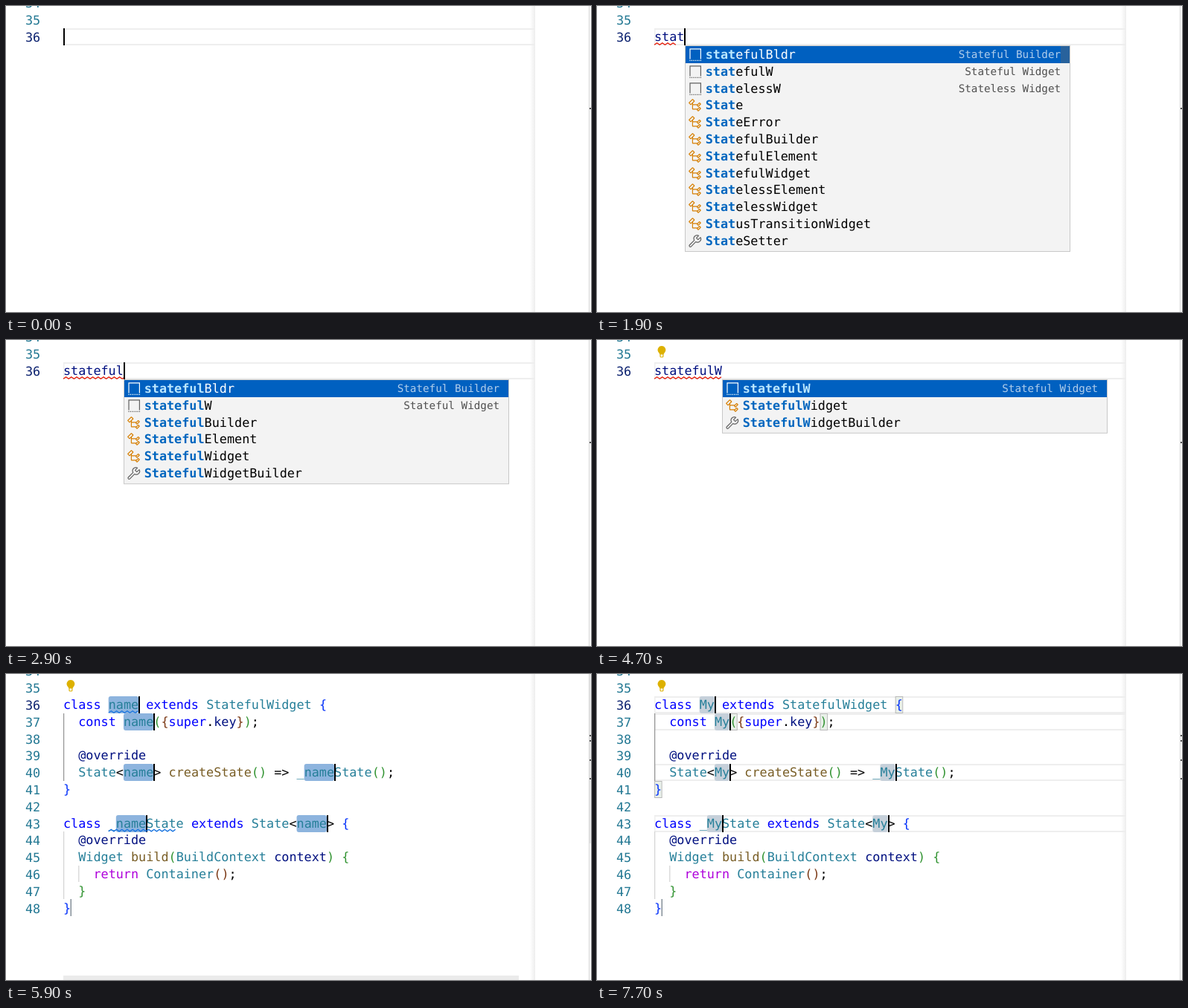
Recreate the animation shown at these times as an HTML page. Size 786 by 412 pixels, loop 8000 ms.

```html
<!DOCTYPE html>
<html lang="en">
<head>
<meta charset="utf-8">
<title>Stateful widget snippet</title>
<style>
  html, body { margin: 0; width: 100%; height: 100%; overflow: hidden; background: #fff; }
  svg { display: block; }
  text { font: 16.8px "DejaVu Sans Mono", monospace; white-space: pre; text-rendering: geometricPrecision; }
  .hit { font-weight: bold; }
  .detail { font-size: 14.28px; text-anchor: end; }
  .num { text-anchor: end; }
</style>
</head>
<body>
<svg id="stage" width="786" height="412" viewBox="0 0 786 412">
  <defs>
    <linearGradient id="shade">
      <stop offset="0" stop-color="#000" stop-opacity="0"/>
      <stop offset="1" stop-color="#000" stop-opacity=".07"/>
    </linearGradient>
    <g id="snippet" fill="none" stroke="currentColor">
      <path d="M2.5 13V1.5h12V13"/>
      <path d="M2 14.5h13" stroke-dasharray="1 1"/>
    </g>
    <path id="class" fill="currentColor" d="M11.34 9.71h.71l2.67-2.67v-.71L13.38 5h-.7l-1.82 1.81h-5V5.56l1.86-1.85V3l-2-2H5L1 5v.71l2 2h.71l1.14-1.15v5.79l.5.5H10v.52l1.33 1.34h.71l2.67-2.67v-.71L13.37 10h-.7l-1.86 1.85h-5v-4H10v.48zm1.69-3.65l.63.63-2 2-.63-.63zm0 5l.63.63-2 2-.63-.63zM3.35 6.65l-1.29-1.3 3.29-3.29 1.3 1.29z"/>
    <path id="wrench" fill="none" stroke="currentColor" stroke-linejoin="round" d="M2 12.3L7.3 7A3.7 3.7 0 0 1 12.2 1.8L9.6 4.5l1.9 1.9 2.7-2.6A3.7 3.7 0 0 1 9 8.7L3.7 14a1.2 1.2 0 0 1-1.7-1.7z"/>
    <g id="bulb">
      <path fill="#ddb100" d="M8.5 1A4.5 4.5 0 0 0 5.36 8.66C6.1 9.4 6.41 10.2 6.41 11.1v1.6a1.3 1.3 0 0 0 1.3 1.3h1.6a1.3 1.3 0 0 0 1.3-1.3v-1.6c0-.9.31-1.7 1.06-2.44A4.5 4.5 0 0 0 8.5 1z"/>
      <path fill="#fff" d="M7.4 10.5h2.2v2.2l-.3.3H7.7l-.3-.3z"/>
    </g>
  </defs>
  <g id="scene"></g>
</svg>
<script>
const LOOP = 8000, LEFT = 77, TOP = 30, CHAR = 10.114, ROW = 22.8;
const BLUE = '#0000ff', TEAL = '#267f99', NAVY = '#001080', BROWN = '#795e26';
const BRACKETS = ['#0431fa', '#319331', '#7b3814'];
const scene = document.getElementById('scene');

// "~" stands for the linked placeholder
const CODE = [
  'class ~ extends StatefulWidget {',
  '  const ~({super.key});',
  '',
  '  @override',
  '  State<~> createState() => _~State();',
  '}',
  '',
  'class _~State extends State<~> {',
  '  @override',
  '  Widget build(BuildContext context) {',
  '    return Container();',
  '  }',
  '}'
];

const DETAIL = {
  singleChildSV: 'Single Child ScrollView', snk: 'Sink', statefulBldr: 'Stateful Builder',
  statefulW: 'Stateful Widget', statelessW: 'Stateless Widget', streamBldr: 'Stream Builder',
  strm: 'Stream', subj: 'Subject'
};
const words = s => s.split(' ');
const STATE = words('State StateError StatefulBuilder StatefulElement StatefulWidget StatelessElement StatelessWidget');
const SHORT = words('statefulBldr statefulW statelessW');
const STAT = [...SHORT, ...STATE, 'StatusTransitionWidget', 'StateSetter'];
const FULL = [...words('statefulBldr statefulW StatefulBuilder StatefulElement StatefulWidget StatefulWidgetBuilder')];
const LISTS = [[],
  [...words('singleChildSV snk statefulBldr statefulW statelessW streamBldr strm subj'),
    'Flutter Widget with AnimationController', 'Flutter Stateful Widget', 'Flutter Stateless Widget', 'SafeArea'],
  [...SHORT, 'streamBldr', 'strm', ...STATE],
  STAT, STAT,
  [...SHORT, ...STATE, 'StateSetter', 'StatefulWidgetBuilder'],
  FULL, FULL, FULL,
  words('statefulW StatefulWidget StatefulWidgetBuilder')
];

// [time, value] steps
const TYPED = [[0, 0], [500, 1], [1400, 2], [1600, 3], [1800, 4], [2100, 5], [2400, 6], [2500, 7], [2900, 8], [3200, 9]];
const WAVY = [[0, 0], [1000, 1], [1600, 2], [1800, 3], [2100, 5], [2500, 6], [2900, 8], [3200, 9]];
const CARET = [[0, 1], [100, 0], [500, 1], [1000, 0], [1400, 1], [3700, 0], [4200, 1], [4700, 0],
  [4900, 1], [5400, 0], [5900, 1], [6400, 0], [6900, 1]];
const BULB = [[0, 0], [900, 1], [1400, 0], [3500, 1], [4900, 0], [5600, 1]];
const NAME = [[0, 'name'], [7100, 'M'], [7500, 'My']];
const at = (steps, t) => steps.reduce((v, s) => t >= s[0] ? s[1] : v, steps[0][1]);

const colX = c => LEFT + c * CHAR;
const rowY = r => TOP + r * ROW;
const esc = s => s.replace(/&/g, '&amp;').replace(/</g, '&lt;').replace(/>/g, '&gt;');
const rect = (x, y, w, h, fill, more = '') =>
  `<rect x="${x}" y="${y}" width="${w}" height="${h}" fill="${fill}" ${more}/>`;
const text = (x, y, s, fill, cls = '') =>
  `<text x="${x}" y="${Math.round(y)}" fill="${fill}" class="${cls}">${esc(s)}</text>`;
const icon = (id, x, y, color) =>
  `<use href="#${id}" transform="translate(${x} ${y}) scale(1.2)" color="${color}"/>`;
const caret = (c, r) => rect(Math.round(colX(c)), Math.round(rowY(r)), 2, 23, '#000');

function squiggle(c, r, n, color) {
  const end = colX(c + n), y = rowY(r) + 21;
  let d = '';
  for (let x = colX(c), i = 0; x <= end + .1; x += 1.8, i++)
    d += `${i ? 'L' : 'M'}${x.toFixed(1)} ${(y + [1.3, 0, -1.3, 0][i % 4]).toFixed(1)}`;
  return `<path d="${d}" fill="none" stroke="${color}" stroke-width="1.3"/>`;
}

function lineBox(r) {
  const y = Math.round(rowY(r));
  return rect(LEFT, y, 633, 2, '#eee') + rect(LEFT, y + 21, 633, 2, '#eee') + rect(LEFT, y, 1.5, 23, '#eee');
}

function frame(t) {
  const after = t >= 4900;
  let s = rect(704, 0, 7, 412, 'url(#shade)') + rect(783, 0, 1, 412, '#d4d4d4');
  for (const y of after ? [82, 89, 115, 140] : [137]) s += rect(784, y, 2, 2, '#555');
  for (let n = 34; n <= (after ? 48 : 36); n++)
    s += text(46.2, 48 + (n - 36) * ROW, String(n), n === 36 ? '#0b216f' : '#237893', 'num');
  return s;
}

function popup(n, t) {
  const list = LISTS[n], typed = 'statefulW'.slice(0, n).toLowerCase();
  const x = Math.round(77.2 + CHAR * n) + .5;
  let s = rect(x, 53.5, 517, list.length * ROW + 3.4, '#f3f3f3', 'stroke="#c8c8c8"');
  s += rect(x + .5, 54, 516, 23, '#0060c0');
  list.forEach((label, i) => {
    const on = i === 0, y = 70.9 + i * ROW;
    const kind = /^[a-z]|^Flutter/.test(label) ? 'snippet' : /Setter|WidgetBuilder/.test(label) ? 'wrench' : 'class';
    const tint = on ? '#fff' : kind === 'class' ? '#d67e00' : '#616161';
    s += icon(kind, x + 3.5, Math.round(y) - 15, tint);
    const hit = label.toLowerCase().indexOf(typed);
    const cut = Math.max(hit, 0), end = hit < 0 ? 0 : cut + n;
    const put = (a, b, fill, cls) => a < b ? text(x + 27.2 + a * CHAR, y, label.slice(a, b), fill, cls) : '';
    const plain = on ? '#fff' : '#000';
    s += put(0, cut, plain) + put(cut, end, on ? '#bbe7ff' : '#0066bf', 'hit') + put(end, label.length, plain);
    if (DETAIL[label]) s += text(x + 504.6, y - 1, DETAIL[label], on ? '#b0cdea' : '#505050', 'detail');
  });
  if (n < 6) s += rect(x + 504.5, 54, 12, 23, 'rgba(100,100,100,.4)');
  return s;
}

function typing(t) {
  const n = at(TYPED, t), w = at(WAVY, t);
  let s = lineBox(0) + text(LEFT, 47, 'statefulW'.slice(0, n), NAVY);
  if (w) s += squiggle(0, 0, w, '#e51400');
  if (at(CARET, t)) s += caret(n, 0);
  if (t >= 800) s += popup(n, t);
  return s;
}

function tokenColor(tok, name, rich) {
  if (/^(class|extends|const|super)$/.test(tok)) return BLUE;
  if (tok === 'return') return '#af00db';
  if (/^(createState|build)$/.test(tok)) return BROWN;
  if (tok === '@override') return rich ? NAVY : BLUE;
  if (tok === 'context') return rich ? NAVY : '#000';
  if (tok === 'key') return NAVY;
  if (tok === name || tok[0] === '_') return rich ? TEAL : '#000';
  return /^[A-Z]/.test(tok) ? TEAL : '#000';
}

function bracketBox(c, r) {
  return rect(colX(c) + .5, Math.round(rowY(r)) + .5, CHAR - .5, 22, '#e9f0e9', 'stroke="#b9b9b9"');
}

function code(t) {
  const name = at(NAME, t), len = name.length, rich = t >= 5200, edited = t >= 7100;
  const lit = !edited || t >= 7400;
  let back = '', front = '', marks = '', depth = 0;
  CODE.forEach((src, r) => {
    const line = src.replace(/~/g, name);
    if (edited && src.includes('~')) back += lineBox(r);
    src.split('~').slice(0, -1).reduce((c, part) => {
      c += part.length;
      if (lit) marks += rect(colX(c), Math.round(rowY(r)), len * CHAR, 23, edited ? '#c6d0da' : '#8db4de', 'rx="3"');
      if (at(CARET, t)) front += caret(c + len, r);
      return c + len;
    }, 0);
    for (const m of line.matchAll(/@?\w+|[^\w\s]/g)) {
      const tok = m[0];
      if (/[)}]/.test(tok)) depth--;
      const fill = /[(){}]/.test(tok) ? BRACKETS[depth] : tokenColor(tok, name, rich);
      if (/[({]/.test(tok)) depth++;
      front = text(colX(m.index), 47 + r * ROW, tok, fill) + front;
    }
  });
  if (t >= 7200) {
    const open = CODE[1].indexOf('(') - 1 + len;
    marks += bracketBox(CODE[0].length + len - 2, 0) + bracketBox(0, 5) + bracketBox(open, 1) + bracketBox(open + 12, 1);
  }
  back += rect(LEFT, 53, 1.2, 91, '#939393') + rect(LEFT, 212, 1.2, 91, '#d3d3d3') + rect(97.2, 258, 1.2, 22, '#d3d3d3');
  if (t >= 5600 && !edited) front += squiggle(6, 0, 4, '#1a75e0') + squiggle(6, 7, 9, '#1a75e0');
  front += rect(86.5, 303, 1.5, 23, '#858f99');
  const fade = Math.min(1, Math.max(0, (6100 - t) / 600)) * .4;
  if (fade) front += rect(LEFT, 406, 612, 6, '#646464', `opacity="${fade.toFixed(2)}"`)
    + rect(784, 0, 2, 228, '#646464', `opacity="${fade.toFixed(2)}"`);
  return back + marks + front;
}

let last = '';
function render(t) {
  const s = frame(t) + (t < 4900 ? typing(t) : code(t)) + (at(BULB, t) ? icon('bulb', 76.7, 6.8, '#ddb100') : '');
  if (s !== last) scene.innerHTML = last = s;
}
const start = performance.now();
function tick() {
  render((performance.now() - start) % LOOP);
  requestAnimationFrame(tick);
}
tick();
</script>
</body>
</html>
```
